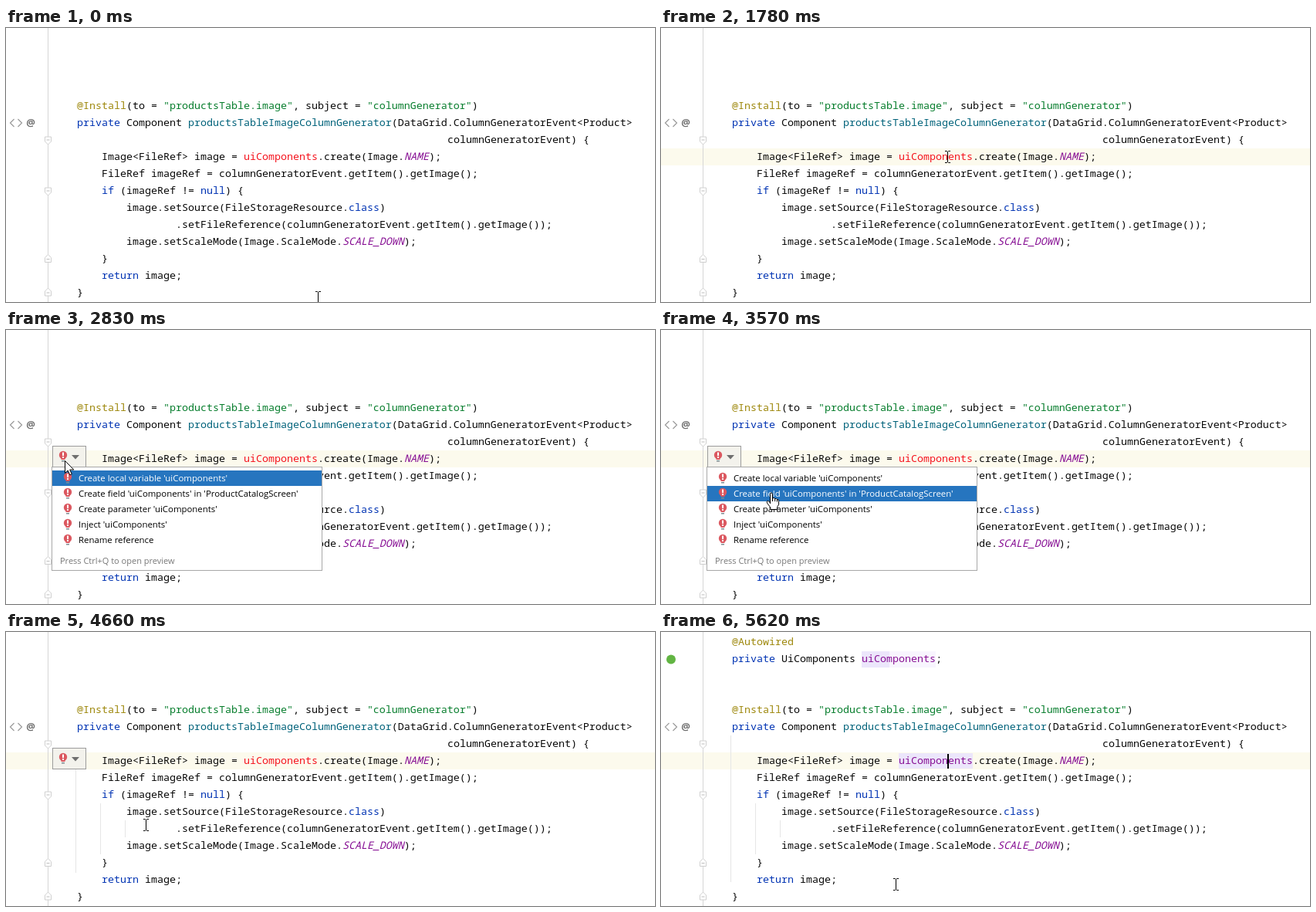
An HTML page for the animation above (6710 ms loop, 841x355 px).

```html
<!DOCTYPE html>
<html lang="en">
<head>
<meta charset="utf-8">
<title>Quick fix in a code editor</title>
<style>
html, body { margin: 0; width: 100%; height: 100%; overflow: hidden; background: #fff; }
svg { display: block; width: 100%; height: 100%; }
text { white-space: pre; }
.code { font: 13.3333px "Noto Sans Mono", monospace; fill: #080808; }
.ui { font: 11.4px "Open Sans", sans-serif; fill: #000; }
.hint { font-size: 11px; fill: #787878; }
.note { fill: #9e880d; }
.key { fill: #0033b3; }
.str { fill: #067d2c; }
.fn { fill: #00627a; }
.con { fill: #871094; font-style: italic; }
.field { fill: #871094; }
.err { fill: #f5141e; }
</style>
</head>
<body>
<svg id="stage" viewBox="0 0 841 355" xmlns="http://www.w3.org/2000/svg"></svg>
<script>
const LOOP = 6710;
const stage = document.getElementById('stage');

function el(tag, attrs = {}, parent = stage) {
  const node = document.createElementNS('http://www.w3.org/2000/svg', tag);
  for (const k in attrs) node.setAttribute(k, attrs[k]);
  parent.appendChild(node);
  return node;
}
const rect = (x, y, width, height, fill, parent, more) =>
  el('rect', { x, y, width, height, fill, ...more }, parent);
const path = (d, stroke, fill = 'none', parent, more) =>
  el('path', { d, stroke, fill, ...more }, parent);
const show = (node, on) => node.setAttribute('visibility', on ? 'visible' : 'hidden');

// Words marked as {class:text} are coloured.
function code(row, col, source, parent) {
  const line = el('text', { class: 'code', x: 92 + col * 8, y: 17 + row * 22 }, parent);
  for (const part of source.split(/(\{\w+:[^}]*\})/)) {
    if (!part) continue;
    const m = part.match(/^\{(\w+):([^}]*)\}$/);
    const span = el('tspan', m ? { class: m[1] } : {}, line);
    span.textContent = m ? m[2] : part;
  }
  return line;
}

function label(x, y, words, cls, parent) {
  const t = el('text', { x, y, class: cls }, parent);
  t.textContent = words;
  return t;
}

function bulb(x, y, parent) {
  const g = el('g', { transform: `translate(${x} ${y})` }, parent);
  el('circle', { r: 5.2, fill: '#db5860' }, g);
  rect(-2.5, 3.5, 5, 2.5, '#db5860', g);
  rect(-2, 7, 4, 1.5, '#7f8b91', g);
  rect(-1, -3.5, 2, 4.6, '#fff', g);
  rect(-1, 2.1, 2, 1.8, '#fff', g);
}

// Editor backdrop
const lineBar = rect(0, 156, 841, 22, '#fcfaed');
path('M54.5 0V355', '#d6d6d6');
for (const [y, dir] of [[145.5, 1], [211.5, 1], [299, -1], [342.5, -1]]) {
  const g = el('g', { transform: `translate(54.5 ${y}) scale(1 ${dir})` });
  path('M-4-4.5H4V1.5L0 5.5L-4 1.5Z', '#cfcfcf', '#fff', g);
  path('M-2-.5H2', '#bdbdbd', 'none', g);
}
path('M10.5 118L5.5 123L10.5 128M15.5 118L20.5 123L15.5 128', '#9a9a9a', 'none', stage, { 'stroke-width': 1.2 });
el('text', { x: 32, y: 127, 'text-anchor': 'middle', fill: '#6e6e6e',
  style: 'font:bold 13px "Open Sans",sans-serif' }).textContent = '@';

const guides = el('g');
const mainGuide = path('', '#e6e6e6', 'none', guides);
path('M122.5 222V288M154.5 244V266', '#e6e6e6', 'none', guides);

// Usage highlights
const marks = el('g');
rect(260, 25, 36, 21, '#ece6fb', marks);
rect(296, 25, 60, 21, '#f8f5fe', marks);
rect(308, 157, 96, 20, '#ece6fb', marks);

// Code
const plainNote = code(0, 0, '@Autowired');
const note = code(0, 0, '{note:@Autowired}');
const plainField = code(1, 0, '{key:private} UiComponents uiComponents;');
const field = code(1, 0, '{key:private} UiComponents {field:uiComponents};');
code(4, 0, '{note:@Install}(to = {str:"productsTable.image"}, subject = {str:"columnGenerator"})');
code(5, 0, '{key:private} Component {fn:productsTableImageColumnGenerator}(DataGrid.ColumnGeneratorEvent<Product>');
code(6, 60, 'columnGeneratorEvent) {');
code(7, 4, 'Image<FileRef> image = ');
const usage = code(7, 27, '{err:uiComponents}').firstChild;
code(7, 39, '.create(Image.{con:NAME});');
code(8, 4, 'FileRef imageRef = columnGeneratorEvent.getItem().getImage();');
code(9, 4, '{key:if} (imageRef != {key:null}) {');
code(10, 8, 'image.setSource(FileStorageResource.{key:class})');
code(11, 16, '.setFileReference(columnGeneratorEvent.getItem().getImage());');
code(12, 8, 'image.setScaleMode(Image.ScaleMode.{con:SCALE_DOWN});');
code(13, 4, '}');
code(14, 4, '{key:return} image;');
code(15, 0, '}');
const caret = rect(371, 158, 2, 19, '#000');
const beanDot = el('circle', { cx: 13, cy: 35.5, r: 6, fill: '#62b543' });

// Fix button and its menu
const bulbOnly = el('g');
bulb(74, 162, bulbOnly);
const button = el('g');
rect(60.5, 150.5, 43, 27, '#f3f2ec', button, { stroke: '#9c9c9c' });
bulb(74, 162, button);
path('M85 162H95L90 167.5Z', 'none', '#6e6e6e', button);

const menu = el('g');
rect(59.5, 177.5, 350, 134, '#fff', menu, { stroke: '#a8a8a8' });
const picked = rect(60, 182, 349, 20, '#2675bf', menu);
const items = [
  "Create local variable 'uiComponents'",
  "Create field 'uiComponents' in 'ProductCatalogScreen'",
  "Create parameter 'uiComponents'",
  "Inject 'uiComponents'",
  'Rename reference'
].map((words, i) => {
  bulb(80, 190 + i * 20, menu);
  return label(94, 195.5 + i * 20, words, 'ui', menu);
});
label(70, 302.5, 'Press Ctrl+Q to open preview', 'ui hint', menu);

// Mouse pointers, hot spot at 0,0
const pointers = { beam: el('g'), arrow: el('g'), hand: el('g') };
path('M-3.5-7.5H-1L0-6.5L1-7.5H3.5M0-7V7M-3.5 7.5H-1L0 6.5L1 7.5H3.5', '#000', 'none', pointers.beam);
path('M.5.5V16.5L4.2 13L6.8 18.8L9.3 17.7L6.7 12H11.8Z', '#000', '#fff', pointers.arrow);
path('M-1.5 14V1.5Q-1.5 0 0 0T1.5 1.5V7Q3.5 5.8 4.7 7.6Q6.5 6.8 7.4 8.6Q9.6 8.2 9.6 10.5V15' +
  'L7.6 18.5V21.5H-1.2V19L-5.4 13.2Q-6.6 11 -4.8 10.4Q-3.6 10 -1.5 13Z' +
  'M1.5 6.5V11M4.7 7.6V11.2M7.4 8.6V11.6', '#000', '#fff', pointers.hand, { 'stroke-linejoin': 'round' });

const moves = [
  [0, 'beam', 404.5, 349], [150, 'beam', 398.5, 331], [300, 'beam', 392.5, 286],
  [450, 'beam', 381.5, 219], [570, 'beam', 374.5, 169], [720, 'beam', 373.5, 167],
  [1780, 'beam', 371.5, 167], [1930, 'beam', 310.5, 168], [2050, 'beam', 170.5, 170],
  [2170, 'beam', 73.5, 172], [2320, 'arrow', 74, 171], [2440, 'arrow', 75, 170],
  [2560, 'arrow', 76, 169], [2680, 'arrow', 76, 169],
  [3450, 'hand', 116, 190], [3570, 'hand', 143, 211], [3720, 'hand', 154, 226],
  [3840, 'hand', 164, 239], [3990, 'hand', 174, 246], [4110, 'hand', 181, 250],
  [4660, 'beam', 181.5, 250], [4810, 'beam', 196.5, 260], [4930, 'beam', 222.5, 276],
  [5070, 'beam', 262.5, 299], [5200, 'beam', 293.5, 316], [5350, 'beam', 300.5, 323],
  [5470, 'beam', 304.5, 327]
];
const picks = [[0, 0], [3570, 1], [3720, 2], [3990, 3]];
const latest = (list, t) => list.filter(step => step[0] <= t).pop();

function draw(t) {
  const within = (from, to = LOOP) => t >= from && t < to;
  const [, kind, x, y] = latest(moves, t);
  for (const name in pointers) show(pointers[name], name === kind);
  pointers[kind].setAttribute('transform', `translate(${x} ${y})`);

  const row = latest(picks, t)[1];
  picked.setAttribute('y', 182 + row * 20);
  items.forEach((item, i) => { item.style.fill = i === row ? '#fff' : '#000'; });

  show(lineBar, within(1000));
  show(bulbOnly, within(2320, 2440));
  show(button, within(2440, 4810));
  show(menu, within(2830, 4660));
  show(guides, within(4660));
  mainGuide.setAttribute('d', within(5070) ? 'M90.5 134V324' : 'M90.5 178V312');
  show(plainNote, within(4810, 5070));
  show(plainField, within(4810, 5070));
  show(note, within(5070));
  show(field, within(5070));
  show(marks, within(4930));
  show(beanDot, within(5200));
  show(caret, within(2050, 2560) || within(4930));
  usage.setAttribute('class', within(5620) ? 'field' : 'err');
}

const start = performance.now();
function tick() {
  draw((performance.now() - start) % LOOP);
  requestAnimationFrame(tick);
}
tick();
</script>
</body>
</html>
```
